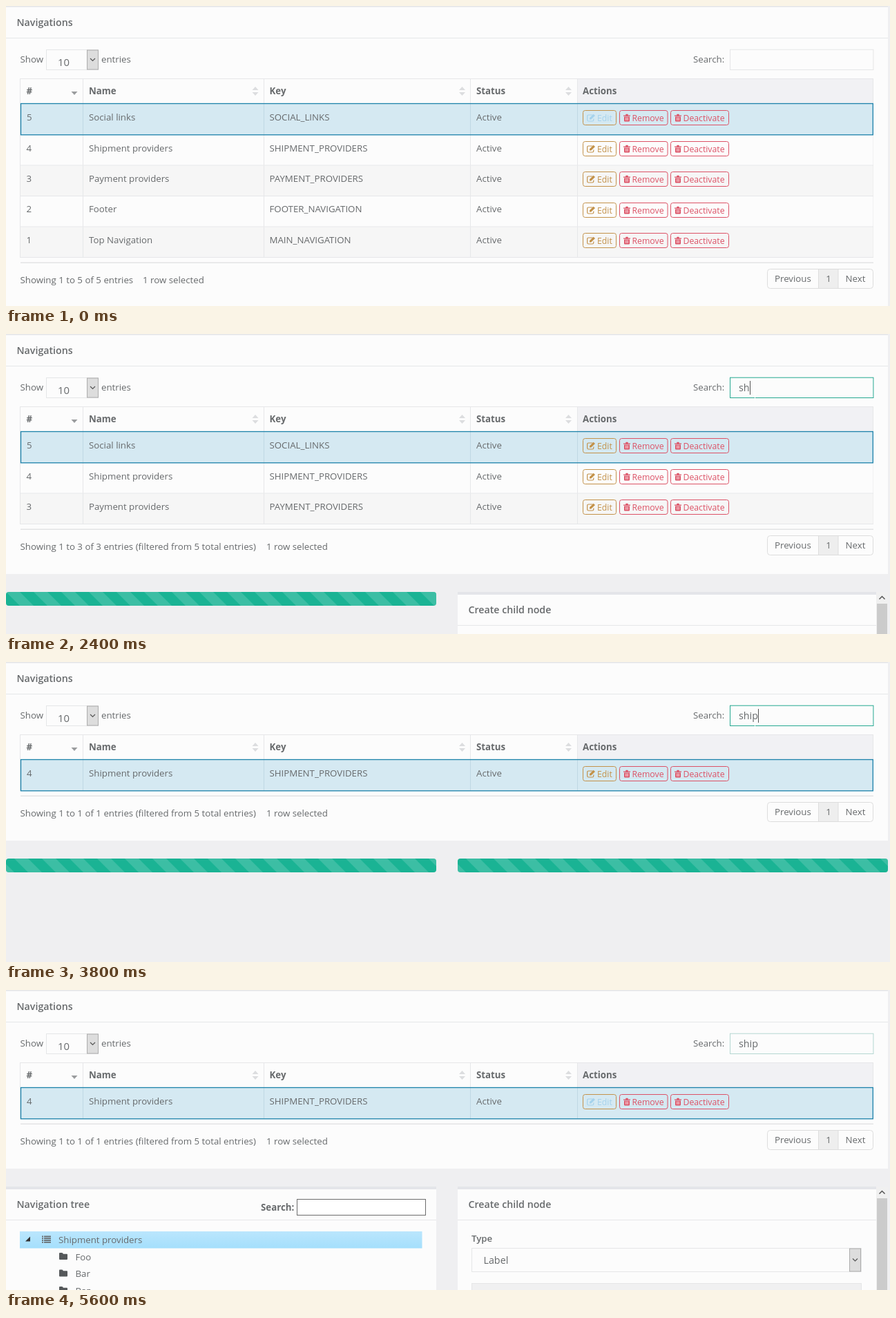
Write an HTML page that moves like this. It is 1280x435 px and loops after 5700 ms.

```html
<!DOCTYPE html>
<html lang="en">
<head>
<meta charset="utf-8">
<title>Navigations</title>
<style>
html, body { margin: 0; width: 100%; height: 100%; overflow: hidden; background: #efeff1; }
svg { display: block; width: 1280px; height: 435px; font-family: "Open Sans", sans-serif; }
text { white-space: pre; }
</style>
</head>
<body>
<svg id="stage" viewBox="0 0 1280 435"></svg>
<script>
const LOOP = 5700, STEP = 100;
const INK = '#676a6c', PAPER = '#fcfcfc', RULE = '#e6e7e9', TEAL = '#1ab394';
const RED = '#dc5266', GOLD = '#c3924a', PALE = '#a6d3ec';
const COLUMNS = [111.5, 373.5, 672.5, 827.5];
const ROWS = [
  [5, 'Social links', 'SOCIAL_LINKS'],
  [4, 'Shipment providers', 'SHIPMENT_PROVIDERS'],
  [3, 'Payment providers', 'PAYMENT_PROVIDERS'],
  [2, 'Footer', 'FOOTER_NAVIGATION'],
  [1, 'Top Navigation', 'MAIN_NAVIGATION']
];
const stage = document.getElementById('stage');

const rect = (x, y, w, h, fill, stroke = 'none', r = 0, width = 1) =>
  `<rect x="${x}" y="${y}" width="${w}" height="${h}" rx="${r}" fill="${fill}" stroke="${stroke}" stroke-width="${width}"/>`;
const path = (d, fill, stroke = 'none', width = 1) =>
  `<path d="${d}" fill="${fill}" stroke="${stroke}" stroke-width="${width}"/>`;
const text = (x, y, s, { size = 13.28, weight = 400, fill = INK } = {}) =>
  `<text x="${x}" y="${y}" font-size="${size}" font-weight="${weight}" fill="${fill}">${s}</text>`;
const at = (x, y, s) => `<g transform="translate(${x} ${y})">${s}</g>`;
const bold = { weight: 700 };
const heading = { size: 14.2, weight: 600 };
const field = { size: 14.3 };

const within = (t, a, b) => t >= a && t < b;
const latest = (t, steps) => steps.filter(s => t >= s[0]).pop()[1];
const rowTop = i => 142.5 + i * 44.5;

function dropButton(x, y, h) {
  return rect(x, y, 16, h, '#dddddd', '#adadad') +
    path(`M${x + 4.5} ${y + h / 2 - 2}l3.5 3.5 3.5 -3.5`, 'none', '#555', 1.2);
}

const editIcon = color =>
  path('M8.5 1.5H2.5Q.7 1.5 .7 3.3V8.7Q.7 10.5 2.5 10.5H8Q9.8 10.5 9.8 8.7V7', 'none', color, 1.2) +
  path('M4 8V5.8L9.6 .2 12 2.5 6.3 8Z', color);
const trashIcon = color =>
  path('M0 2H3L3.6 .3H6.4L7 2H10V3.2H0ZM1 4H9V10Q9 11 8 11H2Q1 11 1 10Z', color) +
  path('M3.3 5V9.5M5 5V9.5M6.7 5V9.5', 'none', '#fff', .7);

function button(x, y, w, label, icon, color, border = color) {
  const gap = icon === editIcon ? 20.5 : 18;
  return rect(x, y, w, 21, 'none', border, 3) +
    at(x + 5.5, y + 5, icon(color)) +
    text(x + gap, y + 15, label, { size: 12.25, fill: color });
}

function sortMarks(x) {
  return path(`M${x - 4.5} 122h9l-4.5 -5zM${x - 4.5} 125h9l-4.5 5z`, '#dcdddf');
}

function tableRow(row, i, editing) {
  const selected = i === 0;
  const top = selected ? 141.5 : rowTop(i);
  const height = rowTop(i + 1) - top;
  const fill = selected ? '#d5e9f2' : i % 2 ? PAPER : '#f6f6f6';
  const baseline = Math.floor(166.6 + i * 44.4);
  const by = Math.floor(rowTop(i) + 9) + .5;
  let out = rect(21, top, 1234.5, height, fill);
  out += path(COLUMNS.map(x => `M${x} ${top}v${height}`).join(''), 'none', selected ? '#bfd8e4' : RULE);
  out += selected ? rect(21.5, 141.5, 1233.8, 45.3, 'none', '#1c82aa', 0, 1.3)
    : path(`M21 ${top + height - .5}H1256`, 'none', RULE);
  out += text(selected ? 30 : 29.5, baseline, row[0]) + text(120, baseline, row[1]) +
    text(381.5, baseline, row[2]) + text(681, baseline, 'Active');
  out += button(835.5, by, 48, 'Edit', editIcon, selected && editing ? PALE : GOLD, GOLD);
  out += button(888.5, by, 69.5, 'Remove', trashIcon, RED);
  return out + button(962.5, by, 84, 'Deactivate', trashIcon, RED);
}

function table(rows, editing) {
  let out = rect(827, 105, 429, 36, '#f1f1f4');
  out += path('M21 105.5H1256' + COLUMNS.map(x => `M${x} 105v36`).join(''), 'none', RULE);
  ['#', 'Name', 'Key', 'Status', 'Actions'].forEach((name, i) => {
    out += text([29.5, 120, 381.5, 681, 835][i], 128, name, bold);
  });
  out += path('M94.5 124h9l-4.5 5z', '#9a9c9e') + [361, 660.5, 814.5].map(sortMarks).join('');
  const bottom = rowTop(rows.length);
  out += path(`M20.5 105V${bottom}M1255.5 105V${bottom}`, 'none', RULE);
  // the selected row comes first and is painted last, so its outline stays on top
  return out + rows.map((row, i) => tableRow(row, i, editing)).reverse().join('');
}

function footer(bottom, count) {
  const filtered = count < ROWS.length;
  const info = `Showing 1 to ${count} of ${count} entries` + (filtered ? ' (filtered from 5 total entries)' : '');
  const y = bottom + 16.5;
  return rect(21, bottom + 6.5, 1235, 1.5, '#e3e4e5') +
    text(20.5, bottom + 37, info) + text(filtered ? 377 : 198, bottom + 37, '1 row selected') +
    rect(1102.5, y, 153, 28, PAPER, '#dddddd', 4) + rect(1176.5, y, 28.5, 28, '#eeeeee', '#dddddd') +
    text(1113, y + 18.5, 'Previous') + text(1187.3, y + 18.5, '1') + text(1215.5, y + 18.5, 'Next');
}

function toolbar(query, focus, caret) {
  const mix = [229, 230, 231].map((c, i) => Math.round(c + ([38, 168, 145][i] - c) * focus));
  const caretX = [1061.5, 1068.5, 1077.5, 1080.5, 1089.5][query.length];
  return text(15.5, 29, 'Navigations', heading) +
    text(20.5, 81.5, 'Show') + rect(58.5, 63.5, 75, 29, PAPER, '#e5e6e7') +
    text(75, 86.5, '10', { size: 14.8 }) + dropButton(117.5, 64, 28) + text(138, 81.5, 'entries') +
    text(995, 81.5, 'Search:') + rect(1048.5, 63.2, 207.4, 29.3, PAPER, `rgb(${mix})`) +
    text(1061, 83, query, field) +
    (caret ? path(`M${caretX} 68V88`, 'none', '#555') : '');
}

function loadingBar(x, y) {
  return at(x, y, rect(0, 0, 623, 20, TEAL, 'none', 4) + rect(0, 0, 623, 20, 'url(#stripes)', 'none', 4));
}

const card = (w, title) => rect(0, 0, w, 160, PAPER) + rect(0, 0, w, 4, '#e4e5e9') +
  path(`M0 48.5H${w}`, 'none', RULE) + text(15.5, 31, title, heading);

function treePanel(y, open) {
  const folder = 'M0 1Q0 0 1 0H4.5L6 1.7H11Q12 1.7 12 2.7V9Q12 10 11 10H1Q0 10 0 9Z';
  let out = card(623, 'Navigation tree') + text(369, 35, 'Search:', bold) +
    rect(421.5, 18.5, 186, 23, '#fff', '#6c6c6c') +
    rect(20, 65, 582.5, 24.5, 'url(#chosen)') +
    path(open ? 'M28 79.5h7v-7z' : 'M29 72v8l4.5 -4z', '#333');
  for (let i = 0; i < 4; i++)
    out += rect(52, 71.5 + i * 2.8, 2, 1.8, INK) + rect(55, 71.5 + i * 2.8, 10, 1.8, INK);
  out += text(76, 82, 'Shipment providers');
  if (open) ['Foo', 'Bar', 'Baz'].forEach((name, i) => {
    out += at(77, 96 + i * 24.5, path(folder, '#55585a')) + text(100.5, 106.5 + i * 24.5, name);
  });
  return at(0, y, out);
}

function childPanel(y) {
  return at(654, y, card(606, 'Create child node') + text(20, 80, 'Type', { weight: 600 }) +
    rect(20.5, 89.5, 564, 34, PAPER, '#e5e6e7') + text(37.5, 112, 'Label', field) +
    dropButton(567.5, 90, 33) + rect(20.5, 140.5, 564, 34, '#f0f0f1', '#e5e6e7') +
    rect(606, 0, 17, 160, '#f0f0f0') + rect(607, 17, 15, 160, '#cbcbcb') +
    path('M610.5 10.5l4 -4 4 4', 'none', '#555', 1.5));
}

function draw(t) {
  const query = latest(t, [[0, ''], [2100, 's'], [2400, 'sh'], [2600, 'shi'], [2800, 'ship']]);
  const rows = latest(t, [[0, ROWS], [2400, ROWS.slice(0, 3)], [2700, ROWS.slice(1, 2)]]);
  const focus = latest(t, [[0, 0], [1100, .25], [1200, .75], [1300, 1], [5600, .25]]);
  const caret = within(t, 1200, 1700) || within(t, 2100, 3300) || within(t, 3800, 4400) || within(t, 4900, 5400);
  const bottom = rowTop(rows.length);
  const lower = bottom + 98;
  const shift = -(t - 2400) / 50 % 40;

  stage.innerHTML = `<defs>
    <pattern id="stripes" width="40" height="20" patternUnits="userSpaceOnUse" patternTransform="translate(${shift})">
      <path d="M0 0H20L40 20H20Z" fill="#fff" fill-opacity=".15"/></pattern>
    <linearGradient id="chosen" x2="0" y2="1"><stop stop-color="#bae6fd"/><stop offset="1" stop-color="#a5dffc"/></linearGradient>
  </defs>` +
    rect(0, 0, 1280, 435, '#efeff1') + rect(0, 0, 1277, bottom + 72, PAPER) +
    rect(0, 0, 1277, 1.5, '#e4e5e7') + path('M0 46.5H1277', 'none', RULE) +
    toolbar(query, focus, caret) + table(rows, !within(t, 2400, 4100)) + footer(bottom, rows.length) +
    // faint pointer resting on the search field
    (within(t, 900, 4600) ? path('M1084.5 84V94', 'none', '#fff') : '') +
    (within(t, 2400, 4100) ? loadingBar(0, lower) : treePanel(lower, t >= 4200)) +
    (within(t, 2500, 4700) ? loadingBar(654, lower) : childPanel(lower));
}

let shown = -1;
function tick() {
  const t = Math.floor(performance.now() % LOOP / STEP) * STEP;
  if (t !== shown) draw(shown = t);
  requestAnimationFrame(tick);
}
tick();
</script>
</body>
</html>
```
